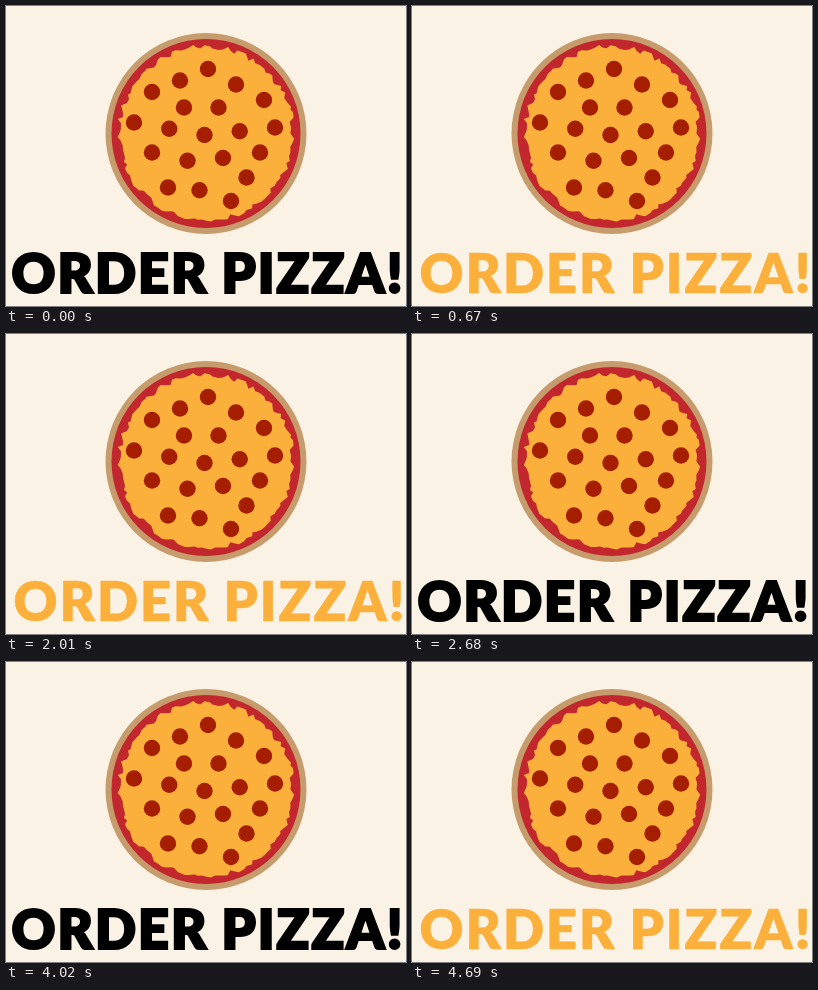
Recreate the animation shown at these times as an HTML page. Size 400x300 px, loop 5.36 s.

```html
<!DOCTYPE html>
<html lang="en">
<head>
<meta charset="utf-8">
<title>Order Pizza!</title>
<style>
  html, body { margin: 0; width: 100%; height: 100%; overflow: hidden; background: #faf2e5; }
  svg { display: block; width: 400px; height: 300px; }
  text { font: 900 54px Lato, sans-serif; letter-spacing: 2px; }
</style>
</head>
<body>
<svg viewBox="0 0 400 300">
  <circle cx="200" cy="127.5" r="100.5" fill="#c69c6d"/>
  <circle cx="200" cy="127.5" r="94.5" fill="#c1272d"/>
  <path id="cheese" fill="#fbb03b"/>
  <g id="pepperoni" fill="#a61e00"></g>
  <g id="slogan" text-anchor="middle">
    <text x="104" y="287">ORDER</text>
    <text x="307" y="287">PIZZA!</text>
  </g>
</svg>
<script>
const BEAT = 670;
const $ = id => document.getElementById(id);

let seed = 7;
const random = () => (seed = seed * 16807 % 2147483647) / 2147483647;

// Ragged cheese edge: a circle with random bites.
const STEPS = 130;
const edge = Array.from({ length: STEPS }, (_, i) => {
  const angle = (i + random() * 0.7) / STEPS * 2 * Math.PI;
  const radius = 89.5 - 5.5 * random();
  return `${200 + radius * Math.cos(angle)} ${127.5 + radius * Math.sin(angle)}`;
});
$("cheese").setAttribute("d", `M${edge.join("L")}Z`);

// A row of evenly spaced slices between two points, bent by `sag` in the middle.
function addRow(count, [x0, y0], [x1, y1], sag = 0) {
  for (let i = 0; i < count; i++) {
    const t = i / (count - 1);
    const x = x0 + (x1 - x0) * t;
    const y = y0 + (y1 - y0) * t + sag * (1 - Math.abs(2 * t - 1));
    $("pepperoni").innerHTML += `<circle cx="${x}" cy="${y}" r="8.2"/>`;
  }
}
addRow(5, [146, 86], [258, 94], -27);
addRow(2, [178, 101.5], [212.5, 101.5]);
addRow(5, [128, 116.5], [269, 121.5], 10);
addRow(3, [146, 146.5], [217, 152], 5.5);
addRow(2, [254, 146.5], [240.5, 171.5]);
addRow(3, [162, 181.5], [225, 195], -4);

function draw(time) {
  const dark = Math.floor(time / BEAT) % 2 === 0;
  const color = dark ? "#000" : "#fbb03b";
  const slogan = $("slogan");
  slogan.setAttribute("fill", color);
  slogan.setAttribute("stroke", color);
  slogan.setAttribute("stroke-width", dark ? 2 : 0.5);
  slogan.setAttribute("transform", `translate(${dark ? 0 : 2} 0)`);
}

const start = performance.now();
function tick() {
  draw(performance.now() - start);
  requestAnimationFrame(tick);
}
tick();
</script>
</body>
</html>
```
